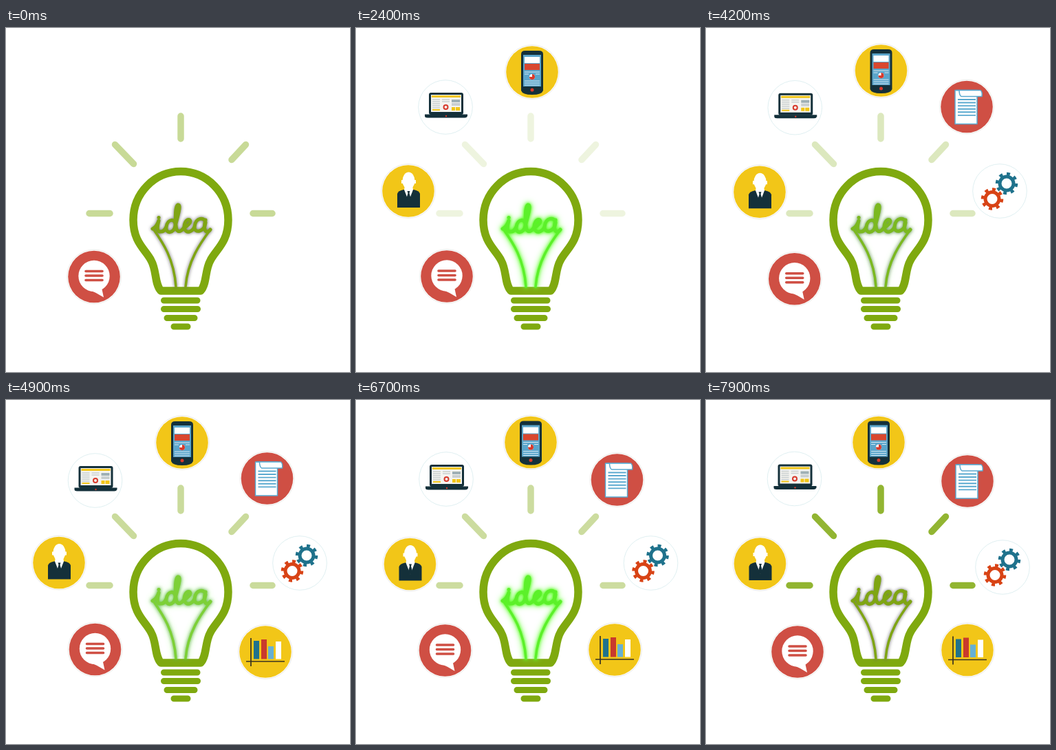
An HTML page that plays this animation: 500x500 px, repeating every 8 s.

```html
<!DOCTYPE html>
<html lang="en">
<head>
<meta charset="utf-8">
<title>Idea</title>
<style>
  html, body { margin: 0; width: 100%; height: 100%; overflow: hidden; background: #fff; }
  svg { display: block; width: 100vw; height: 100vh; }
  .line { fill: none; stroke-linecap: round; stroke-linejoin: round; }
  #dim { stroke: #7fa513; filter: drop-shadow(0 0 2.5px #666); }
  #lit { stroke: #5cf02a; filter: drop-shadow(0 0 2px #4cff10) drop-shadow(0 0 4px #7dff55); }
</style>
</head>
<body>
<svg viewBox="0 0 500 500">
  <defs>
    <g id="word" class="line">
      <path stroke-width="5" d="M213 292Q219 289 222 280Q218 295 223 296Q230 297 233 289C235 276 247 277 246 287C245 299 231 300 233 289M246 288C250 272 255 257 250 257C245 258 246 285 248 293Q252 299 258 291C264 288 270 282 267 279C262 276 257 287 260 293C263 299 271 296 274 289C275 275 289 274 290 283C289 297 273 299 274 289M290 279C287 290 289 296 292 296Q295 296 297 293M222 275.500h.1"/>
      <path stroke-width="3.500" d="M214 292C228 312 244 335 247 376M297 293C283 312 264 338 261 376"/>
    </g>
    <g id="gear" fill="none" stroke="currentColor">
      <circle r="10" stroke-width="5"/>
      <circle r="14" stroke-width="4.500" pathLength="16" stroke-dasharray=".9 1.100"/>
    </g>

    <g id="chat">
      <path fill="#fff" d="M-7 19Q3 23 14 30L11 16Z"/>
      <circle cy="-1" r="22.700" fill="#fff"/>
      <path class="line" stroke="#cf4f44" stroke-width="3.600" d="M-12-8H12M-12-1.500H12M-12 5H12"/>
    </g>
    <g id="user">
      <path fill="#14303a" d="M-16 24V4Q-15-.5-7-2H8Q16-.5 17 4V24Z"/>
      <path fill="#fff" d="M-5-8H6L7-2 .5 15-6-2Z"/>
      <ellipse cx=".5" cy="-15" rx="9" ry="12.500" fill="#fff"/>
      <path fill="#fff" d="M-10-16h21v5h-21z"/>
      <path fill="#14303a" d="M-1.500 0h4l-1 3 2 7-3 6-3-6 2-7z"/>
    </g>
    <g id="laptop">
      <rect x="-24" y="-21" width="50" height="32" rx="3" fill="#14303a"/>
      <path fill="#f4f4f0" d="M-21-18H23V7H-21z"/>
      <path stroke="#f2c618" stroke-width="3" d="M-20-15.500H22"/>
      <path stroke="#c9cfd0" stroke-width="1.300" d="M-19-11h11m-11 3h11m-11 3h11m-11 3h11m-11 3h11M-5-11h11M-5-8h11"/>
      <path fill="#9fb0b5" d="M9-11h12v4H9z"/>
      <path fill="#c9cfd0" d="M9-6h12v4H9z"/>
      <path fill="#f2c618" d="M9 0h5v5H9zM15 0h6v5h-6zM-19 3h11v2h-11z"/>
      <circle cx=".5" r="3" fill="none" stroke="#d8392b" stroke-width="2"/>
      <path fill="#14303a" d="M-30 10.500H32V13Q31 15.500 28 15.500H-26Q-30 15.500-30 13Z"/>
      <circle cx="1" cy="13" r="1.200" fill="#d8392b"/>
    </g>
    <g id="phone">
      <path fill="#14303a" d="M-16-26Q-16-31-10-31H10Q16-31 16-26V27Q14 33 0 33T-16 27Z"/>
      <path fill="#5ba5cb" d="M-13-25H13V21H-13z"/>
      <path fill="#fff" d="M-11-22h22v9h-22z"/>
      <path fill="#d9472f" d="M-11-12h22v9h-22z"/>
      <circle cy="7" r="4" fill="#fff"/>
      <path fill="#d8392b" d="M0 7V3A4 4 0 1 1-4 7Z"/>
      <path stroke="#d5eaf4" stroke-width="1.200" d="M-11 0h22M-11 3h6m10 0h6M-11 13h22m-22 3h22m-22 3h22"/>
      <circle cy="26" r="2.500" fill="#d8392b"/>
    </g>
    <g id="doc" fill="#fff" stroke="#5aa9cf" stroke-width="1.500" stroke-linejoin="round">
      <path d="M-17-24H15V25H-17Z"/>
      <path d="M-15-24H20Q23-22 22-15H-8Q-11-17-11-24Z"/>
      <path stroke-width="1.900" d="M-13-10.500h26m-26 4.500h26m-26 4.600h26m-26 4.600h26m-26 4.600h26m-26 4.600h26"/>
    </g>
    <g id="gears">
      <use href="#gear" x="10" y="-11" color="#1f728c"/>
      <use href="#gear" x="-11" y="11.500" color="#d84315"/>
    </g>
    <g id="chart">
      <path fill="#1f728c" d="M-17-16h8v26.500h-8z"/>
      <path fill="#c93a2c" d="M-6-18h8v28.500h-8z"/>
      <path fill="#67b0d4" d="M4-8h8v18.500H4z"/>
      <path fill="#fff" d="M15-15h8v25.500h-8z"/>
      <path stroke="#3a3320" stroke-width="1.700" d="M-21-20V21M-28 14H28"/>
    </g>
  </defs>

  <g id="rays" class="line" stroke="#7fa90f" stroke-width="9.500">
    <path d="M254 128V161M158.500 169.500L185.500 197.500M348.500 169.500L328 191.500M121 269.500H151M359 269.500H387"/>
  </g>
  <g class="line" stroke="#7fa90f">
    <path stroke-width="11.500" d="M225 382C216 372 219 352 211 338C203 322 185 312 185 279A69 70.500 0 0 1 323 279C323 312 305 322 297 338C289 352 292 372 283 382Z"/>
    <path stroke-width="9" d="M229.500 396H278M229.500 408.500H278.500M234 421.500H274M244 434H264"/>
  </g>
  <g role="img" aria-label="idea">
    <use id="dim" href="#word"/>
    <use id="lit" href="#word"/>
  </g>
  <g id="badges"></g>
</svg>
<script>
const LOOP = 8000, STEP = 100, POP = 300;
const keys = [0, 1000, 2400, 3500, 4900, 6700, 7900];
const rayAlpha = [.43, .32, .13, .13, .41, .4, .85];
const glow = [0, 0, 1, 0, .45, 1, 0];
const red = '#cf4f44', yellow = '#f2c618', white = '#fff';

// Each drift lists one place per key time; late badges list only the last ones.
const badges = [
  ['chat', red, [128, 130, 132, 128, 129.5, 129.5, 133], [361.5, 359.5, 361, 367, 362.5, 364, 366]],
  ['user', yellow, [80, 76, 79, 77, 78.5, 78.5], [239, 237, 240, 236.5, 238.5, 238]],
  ['laptop', white, [130, 129, 129.5, 131, 128.5], [115, 114.5, 117, 115, 114.5]],
  ['phone', yellow, [256, 253, 256, 254, 251], [64, 62, 62, 61.5, 61.5]],
  ['doc', red, [378.5, 379.5, 379.5, 380], [115, 114, 116, 118]],
  ['gears', white, [427, 428.5, 431], [237, 237, 243]],
  ['chart', yellow, [377, 376, 380], [366, 363, 363.5]]
].map(([icon, color, xs, ys], i) => ({ icon, color, xs, ys, start: 800 * i - 300 }));

const $ = id => document.getElementById(id);
const clamp = v => Math.min(1, Math.max(0, v));

$('badges').innerHTML = badges.map(b => `<g>
  <circle r="39.300" fill="#fff" stroke="${b.color === white ? '#dceef0' : '#e6e6e2'}" stroke-width=".9"/>
  <circle r="37.800" fill="${b.color}"/><use href="#${b.icon}"/></g>`).join('');

function ease(values, t) {
  const skip = keys.length - values.length;
  let k = keys.findIndex(key => key > t);
  if (k < 0) k = keys.length;
  const from = values[Math.max(0, k - 1 - skip)];
  const to = values[Math.min(values.length - 1, Math.max(0, k - skip))];
  const u = k < keys.length ? (t - keys[k - 1]) / (keys[k] - keys[k - 1]) : 1;
  return from + (to - from) * (1 - Math.cos(Math.PI * u)) / 2;
}

function draw(t) {
  $('rays').style.opacity = ease(rayAlpha, t);
  const g = ease(glow, t);
  $('lit').style.opacity = g;
  $('dim').style.opacity = 1 - g * g;
  badges.forEach((b, i) => {
    const scale = Math.sin(clamp((t - b.start) / POP) * Math.PI / 2);
    $('badges').children[i].setAttribute('transform',
      `translate(${ease(b.xs, t)} ${ease(b.ys, t)}) scale(${scale})`);
  });
}

const begin = performance.now();
function tick() {
  const t = (performance.now() - begin) % LOOP;
  draw(Math.floor(t / STEP) * STEP);
  requestAnimationFrame(tick);
}
tick();
</script>
</body>
</html>
```
